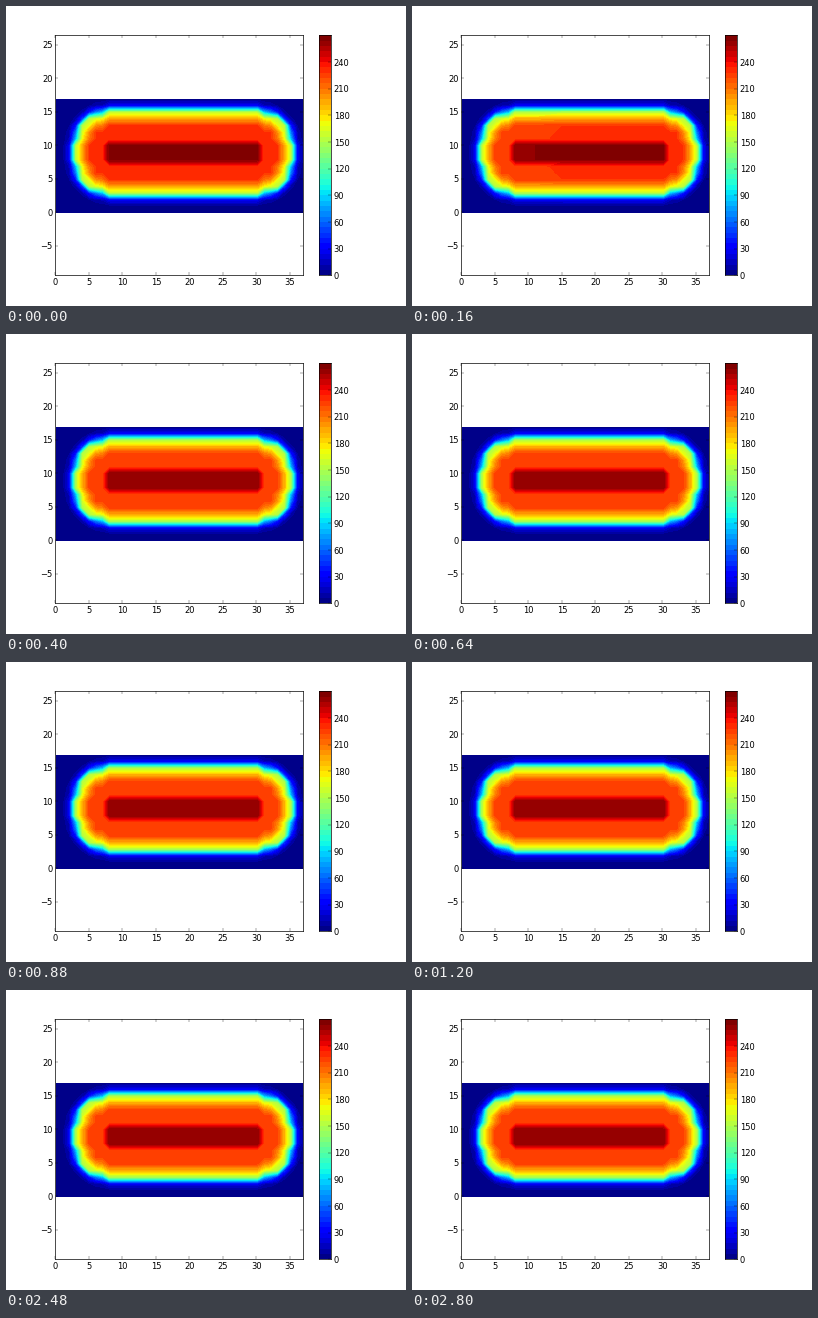
A matplotlib script that plays this animation: 400x300 px, repeating every 8960 ms.

```python
import numpy as np
import matplotlib.pyplot as plt
from matplotlib.animation import FuncAnimation
from matplotlib.colors import BoundaryNorm, ListedColormap

FRAMES, INTERVAL = 112, 80
W, H = 400, 300
SETTLED = 31  # the field no longer changes after this step
NUDGE = 0.6   # pixels, makes the axes lines snap up and to the left

plt.rcParams.update({
    "font.family": "DejaVu Sans", "font.size": 12, "axes.linewidth": 1.0,
    "xtick.direction": "in", "ytick.direction": "in",
    "xtick.major.size": 4, "ytick.major.size": 4,
    "xtick.major.width": 0.5, "ytick.major.width": 0.5,
    "xtick.major.pad": 4, "ytick.major.pad": 4,
})

levels = np.arange(0, 271, 6)
bands = len(levels) - 1
mids = levels[:-1] + 3
cmap = ListedColormap(plt.get_cmap("jet")(mids / mids[-1]))
norm = BoundaryNorm(levels, bands)

# Distance from the hot bar, partly stepped to whole grid cells
X, Y = np.meshgrid(np.arange(38), np.arange(18))
dx = np.maximum(np.abs(X - 19) - 11, 0)
dy = np.maximum(np.abs(Y - 9) - 1, 0)
dist = np.hypot(dx, dy)
ring = dist + 0.5 * (np.ceil(dist) - dist)
profile = [263.4, 226, 225.4, 224.6, 193, 150, 27, 1.5, 0]
base = np.interp(ring, range(9), profile)


def field(step):
    """Temperature after a cooling front has swept left to right."""
    front = -11 + 12 * step
    excess = 3.4 * np.clip((X - front) / 4 + 0.5, 0, 1)
    drift = 0.8 * np.exp(-step / 7)
    return np.clip(base + (excess + drift) * base / 270, 0, 269.9)


def add_axes(left, width):
    """Axes placed by pixel, sharing one height."""
    return fig.add_axes([(left - NUDGE) / W, (30 + NUDGE) / H,
                         width / W, 240 / H])


fig = plt.figure(figsize=(8, 6), dpi=50, facecolor="white")

ax = add_axes(50, 248)
unit = 248 / 37
half = 120 / unit
ax.set(xlim=(0, 37), ylim=(8.5 - half, 8.5 + half),
       xticks=range(0, 36, 5), yticks=range(-5, 26, 5))
ax.tick_params(top=True, right=True)

bar = add_axes(313.5, 12)
bar.pcolormesh([0, 1], levels, mids[:, None], cmap=cmap, norm=norm)
bar.set(xlim=(0, 1), ylim=(0, 270), xticks=[], yticks=range(0, 241, 30))
bar.yaxis.tick_right()

shown = {"step": None, "fill": None}


def update(i):
    step = min(i, SETTLED)
    if step != shown["step"]:
        if shown["fill"] is not None:
            shown["fill"].remove()
        shift = NUDGE / unit
        shown["fill"] = ax.contourf(X + shift, Y - shift, field(step),
                                    levels=levels, cmap=cmap, norm=norm,
                                    antialiased=False)
        ax.set(xlim=(0, 37), ylim=(8.5 - half, 8.5 + half))
        shown["step"] = step
    return []


anim = FuncAnimation(fig, update, frames=FRAMES, interval=INTERVAL,
                     init_func=lambda: update(0), repeat=True,
                     repeat_delay=0, blit=False)
plt.show()
```
